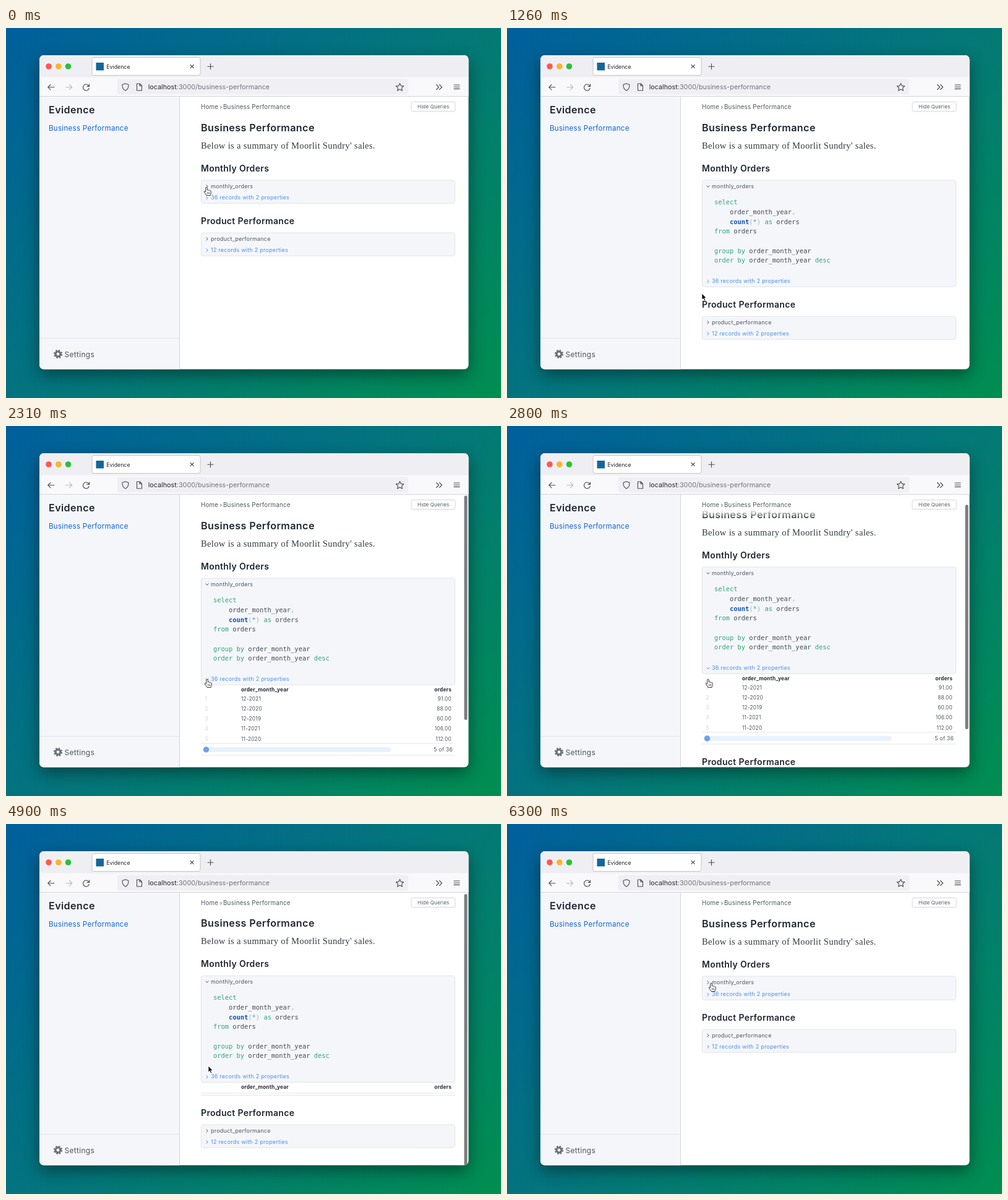
An HTML page that plays this animation: 800x598 px, repeating every 6.37 s.

```html
<!DOCTYPE html>
<html lang="en">
<head>
<meta charset="utf-8">
<title>Business Performance</title>
<style>
html, body { margin: 0; width: 100%; height: 100%; overflow: hidden; }
body { background: linear-gradient(135deg, #005f9c, #04767a 50%, #008e50); }
svg { display: block; }
text { font: 9px Inter, sans-serif; letter-spacing: .025em; fill: #50555d; white-space: pre; }
.frame { fill: #fff; filter: drop-shadow(0 9px 13px rgba(0,0,0,.42)); }
.ui { letter-spacing: 0; fill: #26262b; }
.h1 { font-size: 16.1px; font-weight: 600; fill: #1f2630; }
.h2 { font-size: 14px; font-weight: 600; fill: #1f2630; }
.lead { font: 14.5px "Liberation Serif", serif; letter-spacing: .36px; fill: #33383f; }
.link { fill: #4f8fe8; }
.code { font: 10.4px "DejaVu Sans Mono", monospace; letter-spacing: 0; fill: #454b55; }
.key { fill: #31a375; }
.fn { fill: #134fb5; font-weight: 700; }
.dim { fill: #a9b1bb; }
.cell { font-size: 8.3px; }
.head { font-weight: 700; fill: #262c35; }
.num { fill: #cfd2d8; }
.end { text-anchor: end; }
.card { fill: #f4f6fa; stroke: #e1e4ea; }
.rule { fill: none; stroke: #e2e5ea; }
.icon { fill: none; stroke: #48484e; stroke-width: 1.1; stroke-linecap: round; stroke-linejoin: round; }
.chev { fill: none; stroke: #50555d; stroke-linecap: round; stroke-linejoin: round; }
.chev.blue { stroke: #4f8fe8; }
</style>
</head>
<body>
<svg width="800" height="598" viewBox="0 0 800 598">
  <defs>
    <linearGradient id="fade" x2="0" y2="1">
      <stop offset=".62" stop-color="#fff"/><stop offset="1" stop-color="#fff" stop-opacity="0"/>
    </linearGradient>
    <clipPath id="window"><rect x="54" y="44" width="693.5" height="507.5" rx="7"/></clipPath>
  </defs>
  <rect class="frame" x="54" y="44" width="693.5" height="507.5" rx="7"/>

  <g clip-path="url(#window)">
    <g id="page">
      <text class="h1" x="315" y="167">Business Performance</text>
      <text class="lead" x="315" y="195">Below is a summary of Moorlit Sundry' sales.</text>
      <text class="h2" x="315" y="232">Monthly Orders</text>
      <rect class="card" id="ordersCard" x="315.5" y="246" width="410" rx="3"/>
      <path class="chev" id="queryChev" d="M-1.2-2.2L1.2 0-1.2 2.2"/>
      <text x="331" y="258.5">monthly_orders</text>
      <svg id="query" y="264" width="800" overflow="hidden"></svg>
      <g id="records">
        <path class="chev blue" id="recordsChev" d="M-1.2-2.2L1.2 0-1.2 2.2"/>
        <text class="link" x="331" y="277.3">36 records with 2 properties</text>
        <svg id="table" y="284" width="800" overflow="hidden"></svg>
        <svg id="pager" width="800" overflow="hidden">
          <rect x="318" y="5.5" width="304" height="8" rx="4" fill="#e7f3fc"/>
          <circle cx="323.5" cy="9.5" r="4.7" fill="#6aa3e6"/>
          <text class="end" x="722" y="12.7" style="font-size:8.7px">5 of 36</text>
        </svg>
        <path class="rule" id="rules"/>
      </g>
      <g id="product">
        <text class="h2" x="315" y="317">Product Performance</text>
        <rect class="card" x="315.5" y="331" width="410" height="37.2" rx="3"/>
        <path class="chev" d="M323.8 338.6l2.4 2.2-2.4 2.2"/>
        <path class="chev blue" d="M323.8 356.8l2.4 2.2-2.4 2.2"/>
        <text x="331" y="343.5">product_performance</text>
        <text class="link" x="331" y="361.7">12 records with 2 properties</text>
      </g>
    </g>

    <rect x="281" y="111" width="458" height="39" fill="url(#fade)"/>
    <text y="131.4" style="font-size:9.75px"><tspan x="315">Home</tspan><tspan x="345.5">›</tspan><tspan x="351">Business Performance</tspan></text>
    <rect x="655" y="119.5" width="71" height="15" rx="1.5" fill="#fff" stroke="#d3d6dc"/>
    <text x="665" y="130" style="font-size:8px">Hide Queries</text>
    <rect id="thumb" x="740.5" width="5" rx="2.5" fill="#7c7c80"/>

    <rect x="54" y="111" width="226.5" height="441" fill="#f4f6fa"/>
    <path d="M280.5 111V552" stroke="#d0d4db"/>
    <path class="rule" d="M54 501.5H280"/>
    <text class="h1" x="69" y="138">Evidence</text>
    <text x="69" y="166" style="font-size:11.55px;fill:#1062d8">Business Performance</text>
    <g fill="none" stroke="#6a6f76">
      <circle cx="84" cy="527" r="3.9" stroke-width="3"/>
      <circle cx="84" cy="527" r="6" stroke-width="2.2" stroke-dasharray="2.6 2.112"/>
    </g>
    <text x="94.5" y="531.8" style="font-size:12px">Settings</text>

    <rect x="54" y="44" width="694" height="36" fill="#efeff3"/>
    <rect x="54" y="79.5" width="694" height="31" fill="#f9f9fb"/>
    <path d="M54 110.5H748" stroke="#d5d5da"/>
    <circle cx="69" cy="62" r="4.8" fill="#fe5850"/>
    <circle cx="84.8" cy="62" r="4.8" fill="#fcb42b"/>
    <circle cx="100.5" cy="62" r="4.8" fill="#2ac136"/>
    <rect x="139" y="47.5" width="175" height="29" rx="3" fill="#fff" stroke="#c4c4ca"/>
    <rect x="145.5" y="56" width="12.5" height="12.5" fill="#14669a"/>
    <text class="ui" x="162.3" y="65.8" style="font-size:8.8px">Evidence</text>
    <rect x="180" y="82.5" width="470" height="25" rx="3" fill="#f0f0f4"/>
    <text class="ui" x="229.7" y="99.3" style="font-size:10.8px">localhost<tspan fill="#717178">:3000/business-performance</tspan></text>
    <g class="icon">
      <path d="M298 59.5l5.2 5.2M303.2 59.5l-5.2 5.2M326 62.2h9M330.5 57.7v9"/>
      <path d="M78 95.7H68M72 91.5l-4.2 4.2 4.2 4.2"/>
      <path d="M96.500 95.7h10M102.500 91.500l4.200 4.200-4.200 4.200" stroke="#b9b9be"/>
      <path d="M134.200 94.200a5 5 0 1 0 .2 3M134.600 90.800v3.600h-3.600"/>
      <path d="M193 89.700l5 1.700c.3 5-1.300 8-5 9.800c-3.700-1.800-5.300-4.800-5-9.800z"/>
      <path d="M211.500 90h4.800l3.200 3.200v7.800h-8zM216 90v3.500h3.500"/>
      <path d="M636.500 89.400l1.900 4 4.300.5-3.200 3 .9 4.300-3.900-2.100-3.900 2.100.9-4.300-3.200-3 4.300-.5z"/>
      <path d="M695.500 91.500l4 4-4 4M700.500 91.500l4 4-4 4M724 92h9M724 95.200h9M724 98.400h9"/>
    </g>
  </g>

  <g id="cursor">
    <g id="hand" stroke="#222" stroke-width=".9" stroke-linejoin="round">
      <path fill="#fff" d="M-1.300 1Q0-1 1.300 1V5Q2.600 4 3.500 5.200 4.800 4.500 5.500 5.900 7.200 5.500 7.200 7.200V9.500Q7.200 11 6.200 12.300V13.500H0Q-.8 11.500-3.600 8.200-4.200 6.600-2.600 6.800L-1.300 8Z"/>
      <path d="M1.300 8.500V11M3 8.500V11M4.700 8.500V11" stroke-width=".7"/>
    </g>
    <path id="arrow" d="M0 0V10.200L2.300 8.100 3.900 11.700 5.700 10.900 4.100 7.400H7.200Z" stroke="#fff" stroke-width=".8"/>
  </g>
</svg>

<script>
const LOOP = 6370, STEP = 70;
const $ = id => document.getElementById(id);
const set = (id, attrs) => { for (const k in attrs) $(id).setAttribute(k, attrs[k]); };
const move = (id, x, y, turn = 0) => set(id, { transform: `translate(${x} ${y}) rotate(${turn})` });
const clamp = v => Math.min(1, Math.max(0, v));
const key = s => `<tspan class="key">${s}</tspan>`;
const dim = s => `<tspan class="dim">${s}</tspan>`;

const sql = [
  key('select'),
  '    order_month_year' + dim(','),
  `    <tspan class="fn">count</tspan>${dim('(')}<tspan fill="#4c9fb5">*</tspan>${dim(')')} ${key('as')} orders`,
  key('from') + ' orders',
  '',
  key('group by') + ' order_month_year',
  key('order by') + ' order_month_year ' + key('desc')
];
$('query').innerHTML = sql.map((line, i) =>
  `<text class="code" x="335" y="${21.3 + i * 15.65}">${line}</text>`).join('');

const row = (y, cls, index, month, orders) =>
  `<text class="cell num" x="321.5" y="${y}">${index}</text>
   <text class="cell ${cls}" x="380" y="${y}">${month}</text>
   <text class="cell end ${cls}" x="720" y="${y}">${orders}</text>`;
const data = [['12-2021', '91.00'], ['12-2020', '88.00'], ['12-2019', '60.00'], ['11-2021', '106.00'], ['11-2020', '112.00']];
$('table').innerHTML = row(9.7, 'head', '', 'order_month_year', 'orders') +
  data.map((d, i) => row(24.6 + i * 16.25, '', i + 1, ...d)).join('');

// Height share of a panel opened and later closed by a click
const cubicOut = p => 1 - (1 - clamp(p)) ** 3;
const panel = (t, open, close) =>
  t < close ? cubicOut((t - open) / 400) : cubicOut(1 - (t - close) / 400);
const smooth = p => { p = clamp(p); return p * p * (3 - 2 * p); };

// Pointer stops: time, x, y
const stops = [[0, 324, 257], [640, 324, 257], [1190, 315, 429], [1300, 315, 429], [1700, 325, 409],
  [3850, 325, 409], [4270, 327, 391], [5040, 327, 391], [5650, 330, 257], [LOOP, 330, 257]];
function pointer(t) {
  const i = stops.findIndex(s => s[0] > t);
  const [t0, x0, y0] = stops[i - 1], [t1, x1, y1] = stops[i];
  const p = smooth((t - t0) / (t1 - t0));
  return [x0 + (x1 - x0) * p, y0 + (y1 - y0) * p];
}

function draw(t) {
  const query = panel(t, 140, 5901), table = panel(t, 1890, 4526);
  const drop = 135 * query, tableH = 94.5 * table, pagerH = 19 * table;
  set('ordersCard', { height: 37.3 + drop });
  set('query', { height: drop });
  move('queryChev', 325, 256, t >= 140 && t < 5901 ? 90 : 0);
  move('recordsChev', 325, 274.6, t >= 1890 && t < 4526 ? 90 : 0);
  move('records', 0, drop);
  set('table', { height: tableH });
  set('pager', { y: 284 + tableH, height: pagerH });
  set('rules', { d: table ? `M315 ${283.5 + tableH}H726M315 ${283.5 + tableH + pagerH}H726` : '' });
  move('product', 0, drop + 114 * table);

  const view = 440, pageH = 285 + drop + 114 * table;
  const scroll = Math.max(0, Math.min(18 * smooth((t - 2400) / 350), pageH - view));
  move('page', 0, -scroll);
  set('thumb', { y: 112.5 + scroll * view / pageH, height: pageH > view ? view * view / pageH : 0 });

  const [x, y] = pointer(t);
  const hand = y < 266 || (y > 400 && y < 418) || table > .3;
  move('cursor', x, y);
  set('hand', { visibility: hand ? 'visible' : 'hidden' });
  set('arrow', { visibility: hand ? 'hidden' : 'visible' });
}

function tick() {
  draw(Math.floor(performance.now() % LOOP / STEP) * STEP);
  requestAnimationFrame(tick);
}
tick();
</script>
</body>
</html>
```
